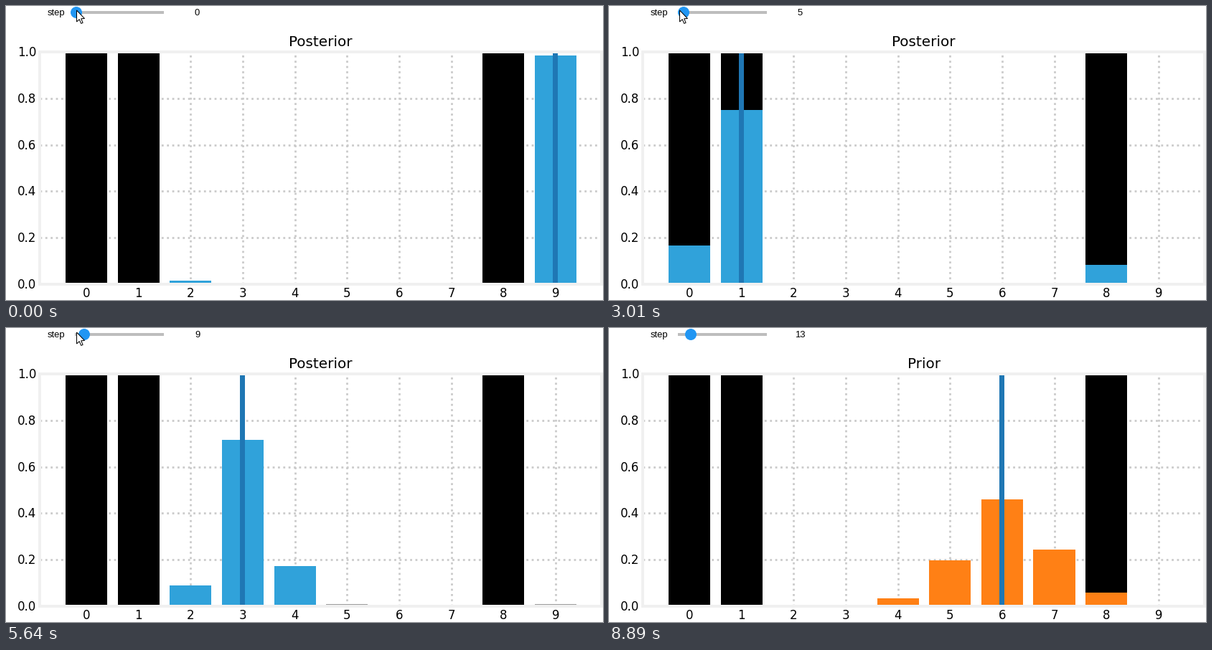
These frames come from a looping animation (832 by 410 pixels, 9410 ms). A matplotlib script:

```python
import numpy as np
import matplotlib.pyplot as plt
from matplotlib.animation import FuncAnimation
from matplotlib.patches import Circle, Polygon, Rectangle

W, H, DPI = 832, 410, 64
PX = 72 / DPI                       # points per pixel
LOOP, FRAMES = 9410, 470
INTERVAL = LOOP / FRAMES

# Times (ms) at which the slider, then the plot, reaches steps 1, 2, 3, ...
SLIDER_TIMES = [190, 930, 1560, 2340, 3010, 3590, 4380,
                5000, 5640, 6260, 6860, 7480, 8100]
PLOT_TIMES = [310, 1260, 1870, 2490, 3300, 4070, 4520,
              5330, 5950, 6380, 7150, 7790, 8240]
# Pointer leaves along a straight line: time and fraction of the way
POINTER_TIMES = [8470, 8610, 8750, 8890]
POINTER_PATH = [0, 0.25, 0.6, 1, None]
POINTER_START, POINTER_END = np.array([98.5, 6]), np.array([802.5, 395])

LEFT, RIGHT, TOP, BOTTOM = 47, 830, 64, 388
X0, DX = 112.1, 72.63
BAR_W = 0.8 * DX

PRIOR, POSTERIOR, MARKER = "#ff8015", "#30a2da", "#1f77b4"
FAINT = "#9c9c9c"                   # bars barely above the frame edge

HALLWAY = np.array([1, 1, 0, 0, 0, 0, 0, 0, 1, 0])
N = len(HALLWAY)


def predict(belief):
    """Move one cell right with kernel (.1, .8, .1), wrapping around."""
    return sum(k * np.roll(belief, s) for s, k in enumerate((0.1, 0.8, 0.1)))


def update(belief, door):
    """Weigh the belief with an almost perfect door sensor."""
    weighted = belief * np.where(HALLWAY == door, 1e8, 1)
    return weighted / weighted.sum()


def simulate(count):
    belief, priors, posteriors = np.full(N, 1 / N), [], []
    for i in range(count):
        priors.append(predict(belief))
        belief = update(priors[-1], HALLWAY[i % N])
        posteriors.append(belief)
    return priors, posteriors


priors, posteriors = simulate(50)

fig = plt.figure(figsize=(W / DPI, H / DPI), dpi=DPI, facecolor="white")
ax = fig.add_axes([0, 0, 1, 1])
ax.set_xlim(0, W)
ax.set_ylim(H, 0)
ax.axis("off")


def cell_x(i):
    return X0 + DX * i


def level_y(p):
    return BOTTOM - (BOTTOM - TOP) * p


def label(x, y, text, size, ha="center", font="DejaVu Sans"):
    return ax.text(x, y, text, fontsize=size * PX, ha=ha, va="baseline",
                   family=font, color="black", zorder=8)


def grid_line(xs, ys):
    ax.plot(xs, ys, color="#cbcbcb", lw=2.78 * PX, ls=(0, (1, 1.65)), zorder=1)


def make_bar(i, p, color, zorder):
    bar = Rectangle((cell_x(i) - BAR_W / 2, BOTTOM), BAR_W, level_y(p) - BOTTOM,
                    fc=color, lw=0, zorder=zorder)
    return ax.add_patch(bar)


# Chart frame, grid and tick labels
for i in range(N):
    grid_line([cell_x(i)] * 2, [BOTTOM, TOP])
    label(cell_x(i), 406, str(i), 50 / 3)
for p in np.linspace(0, 1, 6):
    if 0 < p < 1:
        grid_line([LEFT, RIGHT], [level_y(p)] * 2)
    label(42.5, level_y(p) + 6, f"{p:.1f}", 50 / 3, ha="right")
ax.add_patch(Rectangle((LEFT, TOP), RIGHT - LEFT, BOTTOM - TOP, fill=False,
                       ec="#f0f0f0", lw=4 * PX, zorder=6))

for i in np.flatnonzero(HALLWAY):
    make_bar(i, 1, "black", 2)
bars = [make_bar(i, 0, PRIOR, 3) for i in range(N)]
marker = ax.add_patch(Rectangle((0, TOP), 7, BOTTOM - TOP, fc=MARKER, lw=0,
                                zorder=4))
title = label(438.7, 56, "", 20)

# Slider
label(57.5, 13, "step", 13, ha="left", font="Liberation Sans")
ax.add_patch(Rectangle((96, 7), 124, 4, fc="#bdbdbd", lw=0, zorder=7))
knob = ax.add_patch(Circle((98, 9), 8, fc="#2196f3", lw=0, zorder=8))
readout = label(266.5, 13, "", 13, font="Liberation Sans")

ARROW = np.array([(0, 0), (0, 16), (3.7, 12.6), (6.2, 18.4), (8.6, 17.4),
                  (6.2, 11.7), (11, 11.5)])
pointer = ax.add_patch(Polygon(ARROW, closed=True, fc="white", ec="black",
                               lw=1 * PX, joinstyle="miter", zorder=10))


def show_plot(step):
    i, is_posterior = divmod(step - 1, 2)
    belief = (posteriors if is_posterior else priors)[i]
    color = POSTERIOR if is_posterior else PRIOR
    title.set_text("Posterior" if is_posterior else "Prior")
    for bar, p in zip(bars, belief):
        bar.set_height(level_y(p) - BOTTOM)
        bar.set_facecolor(color if p > 0.012 else FAINT)
        bar.set_visible(p > 0.0065)
    marker.set_x(round(cell_x(i % N) - 3.5))


def show_slider(step):
    knob.center = (round(98.1 + 1.22 * step), 9)
    readout.set_text(str(step))


def show_pointer(part):
    pointer.set_visible(part is not None)
    if part is not None:
        pointer.set_xy(ARROW + POINTER_START + part * (POINTER_END - POINTER_START))


def passed(times, t):
    return int(np.searchsorted(times, t, side="right"))


def draw(frame):
    t = (frame + 1) * INTERVAL
    show_slider(passed(SLIDER_TIMES, t))
    show_plot(passed(PLOT_TIMES, t))
    show_pointer(POINTER_PATH[passed(POINTER_TIMES, t)])
    return []


anim = FuncAnimation(fig, draw, frames=FRAMES, interval=INTERVAL, repeat=True,
                     repeat_delay=0, cache_frame_data=False)
plt.show()
```
